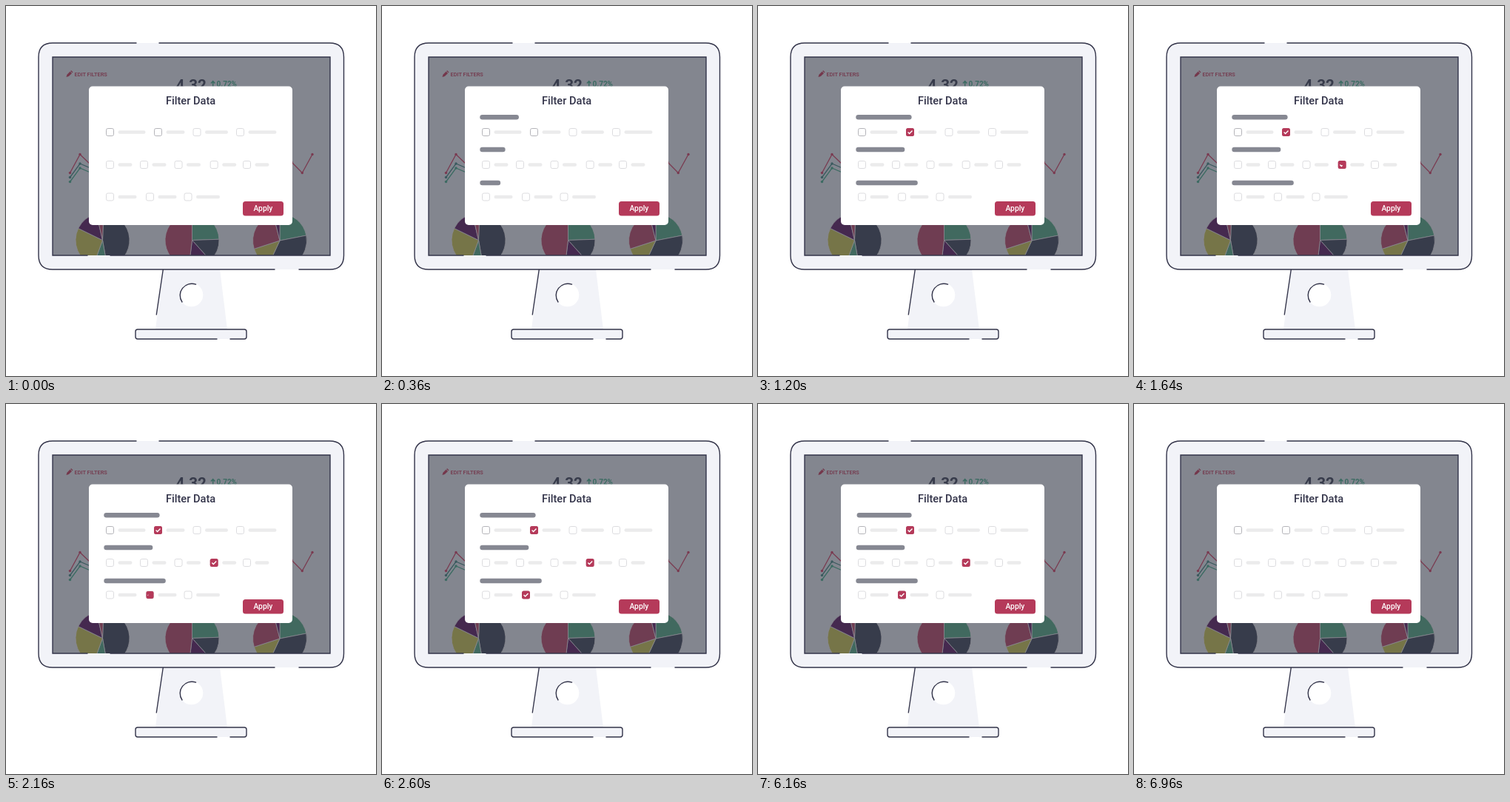
Recreate the animation shown at these times as an HTML page. Size 500 by 500 pixels, loop 7840 ms.

```html
<!DOCTYPE html>
<html lang="en">
<head>
<meta charset="utf-8">
<title>Filter Data</title>
<style>
  html, body { margin: 0; width: 100%; height: 100%; overflow: hidden; background: #fff; }
  svg { display: block; width: 100vw; height: 100vh; font-family: Roboto, Inter, sans-serif; }
  .ink { fill: none; stroke: #33344a; stroke-width: 1.4; stroke-linecap: round; }
  .shell { fill: #f2f3f8; }
</style>
</head>
<body>
<svg viewBox="0 0 500 500">
  <defs><clipPath id="screen"><rect x="63" y="69" width="375" height="268"/></clipPath></defs>

  <!-- stand -->
  <path class="shell" d="M212 356H289L299 437H202Z"/>
  <path class="ink" d="M212.3 356L203.3 417"/>
  <circle cx="250.5" cy="390.5" r="15.8" fill="#fff"/>
  <path class="ink" d="M256.5 376.2A15.8 15.8 0 0 0 238 400"/>
  <rect class="shell" x="175" y="437" width="150" height="13" rx="3"/>
  <path class="ink" d="M285 450H178Q175 450 175 447V440Q175 437 178 437H322Q325 437 325 440V447Q325 450 322 450H303"/>

  <!-- monitor -->
  <rect class="shell" x="44" y="50" width="412.5" height="306" rx="19"/>
  <path class="ink" d="M176 50H63Q44 50 44 69V337Q44 356 63 356H363M396 356H437.5Q456.5 356 456.5 337V69Q456.5 50 437.5 50H207"/>
  <rect x="63" y="69" width="375" height="268" fill="#83868f"/>

  <g clip-path="url(#screen)">
    <g id="pies" stroke="#898a91" stroke-width=".8"></g>
    <g id="lines"></g>
    <path d="M81.5 96L82.4 92.7L86.6 88.5L89 90.9L84.8 95.1ZM87.2 87.9L88.1 87L90.5 89.4L89.6 90.3Z" fill="#74384c"/>
    <text x="92.5" y="95" font-size="7.4" font-weight="500" fill="#74384c">EDIT FILTERS</text>
    <text x="229.5" y="114" font-size="20.5" font-weight="700" fill="#373b4b">4.32</text>
    <path d="M279.7 109V102M277 104.5L279.7 101.5L282.4 104.5" fill="none" stroke="#3b6b62" stroke-width="1.5"/>
    <text x="284.5" y="109" font-size="10" font-weight="700" fill="#3b6b62">0.72%</text>
  </g>
  <path class="ink" d="M110 337H63V69H438V337H141"/>

  <!-- dialog -->
  <rect x="112" y="108.5" width="275" height="187.5" rx="5" fill="#fff"/>
  <text x="249.6" y="133.3" font-size="14.6" font-weight="500" text-anchor="middle" fill="#33344a">Filter Data</text>
  <g id="options"></g>
  <g id="headings" fill="#868892"></g>
  <g id="checks"></g>
  <rect x="320" y="264" width="55" height="19.5" rx="3.5" fill="#b53a5a"/>
  <text x="347.4" y="276.6" font-size="10.3" font-weight="500" text-anchor="middle" fill="#fff">Apply</text>
</svg>
<script>
const LOOP = 7840;
const red = '#6f3d52', green = '#41695f', dark = '#373c4b', purple = '#45294f', olive = '#767548';

function add(parent, tag, attrs) {
  const el = document.createElementNS('http://www.w3.org/2000/svg', tag);
  set(el, attrs);
  (typeof parent === 'string' ? document.getElementById(parent) : parent).append(el);
  return el;
}
function set(el, attrs) {
  for (const key in attrs) el.setAttribute(key, attrs[key]);
}

// Slices are [end angle, colour], clockwise from the top.
function pie(cx, cy, start, slices) {
  const r = 36.5;
  const at = deg => {
    const a = deg * Math.PI / 180;
    return `${cx + r * Math.sin(a)} ${cy - r * Math.cos(a)}`;
  };
  for (const [end, fill] of slices) {
    const large = end - start > 180 ? 1 : 0;
    add('pies', 'path', { d: `M${cx} ${cy}L${at(start)}A${r} ${r} 0 ${large} 1 ${at(end)}Z`, fill });
    start = end;
  }
}
pie(130.5, 316.5, 2, [[170, dark], [200, green], [296, olive], [347, purple], [362, red]]);
pie(251.5, 316.5, 0, [[88, green], [138, dark], [187, purple], [360, red]]);
pie(370, 317, 0, [[79, green], [205, dark], [252, olive], [346, red], [360, purple]]);

function chart(color, points) {
  add('lines', 'polyline', { points: points.join(' '), fill: 'none', stroke: color, 'stroke-width': 1.3 });
  for (const [cx, cy] of points) add('lines', 'circle', { cx, cy, r: 1.7, fill: color });
}
chart('#3b6b62', [[86.5, 237.5], [100, 219], [114, 225]]);
chart('#3a5a5e', [[86.5, 231.5], [100, 213], [114, 219]]);
chart('#7a3a50', [[86.5, 225.5], [100, 200.5], [114, 214]]);
chart('#7a3a50', [[386, 211], [400.3, 225.5], [414, 200.5]]);

// Each row: y, then pairs of box centre and label width.
const rows = [
  [170.5, [140.5, 37], [205.5, 25], [258, 31], [316.5, 38]],
  [214.5, [140.5, 19], [186.5, 19], [233, 19], [281.2, 19], [325.5, 19]],
  [258, [140.5, 25], [194.5, 25], [246, 32]]
];
rows.forEach(([y, ...items], row) => items.forEach(([x, width], i) => {
  add('options', 'rect', {
    x: x - 5, y: y - 5, width: 10, height: 10, rx: 2.2, fill: '#fff',
    stroke: row === 0 && i < 2 ? '#b4b4b9' : '#dcdcdf'
  });
  add('options', 'rect', { x: x + 11, y: y - 2.2, width, height: 4.4, rx: 2.2, fill: '#ebebec' });
}));

const headings = [[150.3, 75.3], [194, 66], [239, 83.5]].map(([y, width]) => ({
  width, el: add('headings', 'rect', { y: y - 3.2, height: 6.4, rx: 3.2 })
}));

const checks = [[205.5, 170.5, 820], [281.2, 214.5, 1400], [194.5, 258, 2000]].map(([x, y, start]) => {
  const g = add('checks', 'g', { transform: `translate(${x} ${y})` });
  return {
    start,
    box: add(g, 'rect', { x: -5.5, y: -5.5, width: 11, height: 11, rx: 2.5, fill: '#b53a5a' }),
    tick: add(g, 'path', {
      d: 'M-2.9 .1L-.9 2.1L3 -2', pathLength: 1, fill: 'none', stroke: '#fff', 'stroke-width': 1.4
    })
  };
});

const progress = (t, start, length) => Math.min(1, Math.max(0, (t - start) / length));
const ease = p => p < .5 ? 2 * p * p : 1 - 2 * (1 - p) ** 2;

function draw(now) {
  const t = now % LOOP;

  // Headings grow from the left, then wipe away towards the right.
  headings.forEach(({ el, width }, i) => {
    const end = width * ease(progress(t, i * 60, 590));
    const begin = width * ease(progress(t, 6090 + i * 30, 760));
    set(el, { x: 132.3 + begin, width: Math.max(0, end - begin) });
  });

  checks.forEach(({ start, box, tick }, i) => {
    const out = 6180 + i * 120;
    const size = ease(progress(t, start, 200)) * (1 - ease(progress(t, out + 160, 200)));
    const line = ease(progress(t, start + 110, 250)) * (1 - ease(progress(t, out, 240)));
    set(box, { transform: `scale(${size})` });
    set(tick, { 'stroke-dasharray': `${line} 2`, opacity: line > 0 ? 1 : 0 });
  });
  requestAnimationFrame(draw);
}
requestAnimationFrame(draw);
</script>
</body>
</html>
```
